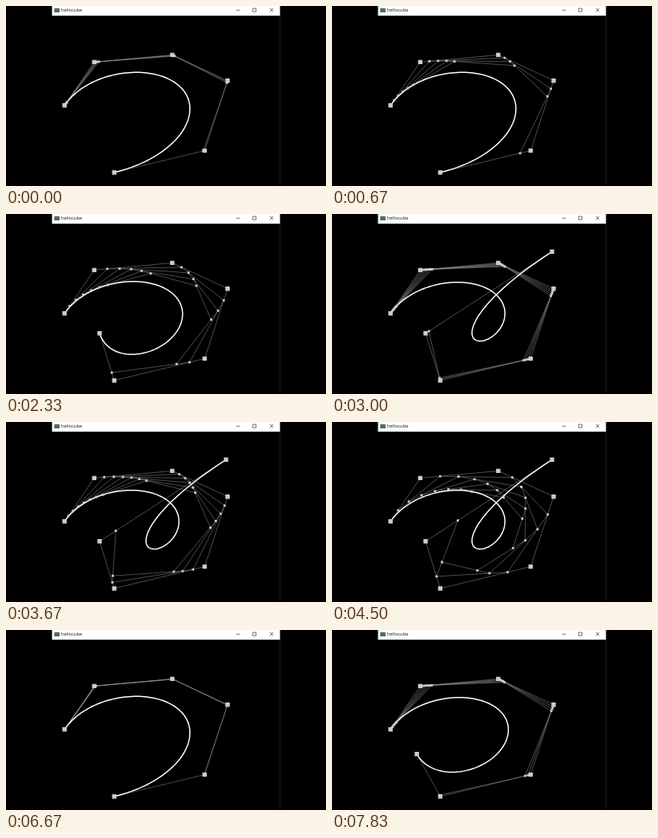
Write an HTML page that moves like this. It is 400 px wide and 226 px high and loops after 8000 ms.

```html
<!DOCTYPE html>
<html lang="en">
<head>
<meta charset="utf-8">
<title>Bezier construction</title>
<style>
  html, body { margin: 0; width: 100%; height: 100%; overflow: hidden; background: #000; }
  svg { display: block; width: 400px; height: 226px; }
  text { font: 5.8px "Open Sans", "Noto Sans", sans-serif; fill: #111; }
  .btn { fill: none; stroke: #333; stroke-width: .7; }
  #mesh { fill: none; stroke: #999; stroke-width: .5; }
  #curve { fill: none; stroke: #fff; stroke-width: 1.5; stroke-linejoin: round; }
  #dots, #knots { fill: #ccc; }
</style>
</head>
<body>
<svg viewBox="0 0 400 226">
  <rect width="400" height="226"/>
  <path d="M342.5 12V224" stroke="#1c1c1c"/>
  <rect x="57.5" width="285" height="12.2" fill="#fff"/>
  <rect x="60.3" y="2.8" width="6.6" height="5.2" fill="#47705f"/>
  <text x="69" y="7.4">hellocube</text>
  <path class="btn" d="M287.7 5.3h4.6M308.3 3h4.2v4.2h-4.2zM329.8 2.9l4.4 4.4m0-4.4l-4.4 4.4"/>
  <path id="mesh"/>
  <path id="curve"/>
  <path id="dots"/>
  <path id="knots"/>
</svg>
<script>
const LOOP = 8000, FPS = 6, RATE = 0.0254;

const base = [[73.2, 124.8], [110.3, 70.4], [207.8, 61.4], [277, 93.7], [248.3, 181.6], [135.3, 209]];
const inner = [117, 149.8], moved = [106, 155.8], far = [275, 47.3];

// from, hold: steps of the clock; zero: the step at which t leaves 0
const scenes = [
  { from: 0, zero: -0.6, hold: 5, pts: base },
  { from: 7, zero: 7.43, hold: 14, pts: [...base, inner] },
  { from: 16, zero: 16.96, hold: 30, pts: [...base, inner, far] },
  { from: 32, zero: 32.43, hold: 39, pts: [...base, inner] },
  { from: 40, zero: 39.8, hold: 45, pts: base },
  { from: 46, zero: 45.8, hold: 48, pts: [...base, moved] }
];

const mix = (a, b, t) => [a[0] + (b[0] - a[0]) * t, a[1] + (b[1] - a[1]) * t];
const reduce = (pts, t) => pts.slice(1).map((p, i) => mix(pts[i], p, t));
const line = pts => 'M' + pts.map(p => p[0].toFixed(2) + ' ' + p[1].toFixed(2)).join('L');
const square = size => ([x, y]) => `M${x - size / 2} ${y - size / 2}h${size}v${size}h${-size}z`;
const setPath = (id, d) => document.getElementById(id).setAttribute('d', d);

function levels(pts, t) {
  const out = [pts];
  while (pts.length > 1) out.push(pts = reduce(pts, t));
  return out;
}

function curve(pts) {
  const n = 100;
  return Array.from({ length: n + 1 }, (_, i) => levels(pts, i / n).pop()[0]);
}

function draw(step) {
  const { pts, zero, hold } = scenes.filter(s => s.from <= step).pop();
  const t = Math.max(0, (Math.min(step, hold) - zero) * RATE);
  const all = levels(pts, t);
  setPath('mesh', all.slice(0, -1).map(line).join(''));
  setPath('curve', line(curve(pts)));
  setPath('dots', all.slice(1).flat().map(square(2.8)).join(''));
  setPath('knots', pts.map(square(5.4)).join(''));
}

let shown = -1;
function tick() {
  const ms = performance.now() % LOOP;
  const step = Math.min(47, Math.floor((ms + 5) * FPS / 1000));
  if (step !== shown) draw(shown = step);
  requestAnimationFrame(tick);
}
tick();
</script>
</body>
</html>
```
